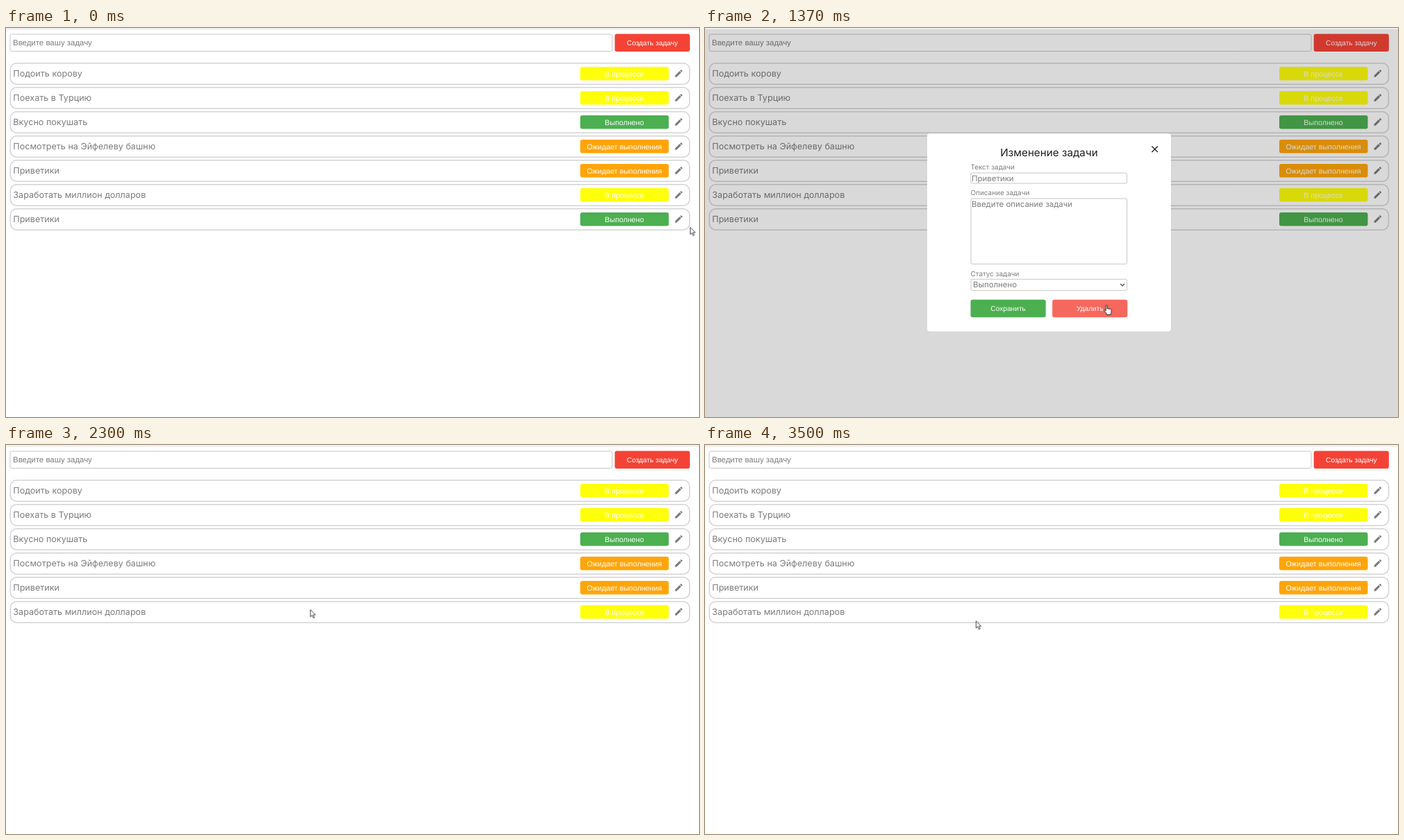
An HTML page that plays this animation: 998 by 561 pixels, repeating every 4270 ms.

```html
<!DOCTYPE html>
<html lang="ru">
<head>
<meta charset="utf-8">
<title>Список задач</title>
<style>
  html, body { margin: 0; width: 100%; height: 100%; overflow: hidden; background: #fff; }
  svg { display: block; width: 100%; height: 100%; }
  text { font-family: Inter, sans-serif; fill: #7c7c7c; text-rendering: geometricPrecision; }
  .arial { font-family: "Liberation Sans", Arial, sans-serif; }
  .button { font-size: 10.17px; fill: #fff; text-anchor: middle; }
  .badge { font-size: 10.74px; fill: #fff; text-anchor: middle; }
  .task { font-size: 12.6px; }
  .title { font-size: 15.26px; fill: #212121; text-anchor: middle; }
  .label { font-size: 9.95px; }
  .field { font-size: 11.45px; }
  .box { fill: #fff; stroke: #c6c6c6; }
  .row { fill: #fff; stroke: #d3d3d3; stroke-width: 1.5; }
  .pencil { fill: #7c7c7c; }
  .cursor { fill: #fff; stroke: #222; stroke-width: 1.3; stroke-linejoin: round; }
</style>
</head>
<body>
<svg id="stage" viewBox="0 0 998 561"></svg>
<script>
const LOOP = 4270;
const GREEN = '#4caf50', RED = '#f44336';
const STATUS = {
  progress: ['В процессе', '#ffff0a'],
  done: ['Выполнено', GREEN],
  waiting: ['Ожидает выполнения', '#ffa50a'],
};
const TASKS = [
  ['Подоить корову', 'progress'],
  ['Поехать в Турцию', 'progress'],
  ['Вкусно покушать', 'done'],
  ['Посмотреть на Эйфелеву башню', 'waiting'],
  ['Приветики', 'waiting'],
  ['Заработать миллион долларов', 'progress'],
  ['Приветики', 'done'],
];
const PENCIL = 'M3 17.25V21h3.75L17.81 9.94l-3.75-3.75L3 17.25z' +
  'M20.71 7.04c.39-.39.39-1.02 0-1.41l-2.34-2.34c-.39-.39-1.02-.39-1.41 0l-1.83 1.83 3.75 3.75 1.83-1.83z';

const rect = (x, y, w, h, rx, attrs) =>
  `<rect x="${x}" y="${y}" width="${w}" height="${h}" rx="${rx}" ${attrs}/>`;
const text = (x, y, cls, str) => `<text x="${x}" y="${y}" class="${cls}">${str}</text>`;
const button = (id, x, y, color, label) =>
  `<g id="${id}">${rect(x, y, 108.2, 25.5, 3, `fill="${color}"`)}${text(x + 54.1, y + 16.2, 'arial button', label)}</g>`;
const field = (y, h, label, value, indent = 1) =>
  text(382.5, y - 4.7, 'label', label) +
  rect(383, y, 224.7, h, 2, 'class="box"') +
  text(383 + indent, y + 12.1, 'field', value);

function taskRow([name, status], i) {
  const [label, color] = STATUS[status];
  return `<g id="task${i}" transform="translate(0 ${50 + i * 35})">
    ${rect(6.3, .8, 978.2, 30.4, 9, 'class="row"')}
    ${text(10.3, 20.4, 'task', name)}
    ${rect(827, 6, 127.5, 19.6, 3, `fill="${color}"`)}
    ${text(890.5, 19.8, 'arial badge', label)}
    <path class="pencil" transform="translate(961.8 8.4) scale(.59)" d="${PENCIL}"/>
  </g>`;
}

document.getElementById('stage').innerHTML = `
  ${rect(0, 1, 998, 1, 0, 'fill="#dedede"')}
  ${rect(6, 9, 867, 24.5, 2.5, 'class="box"')}
  ${text(10, 25, 'arial field', 'Введите вашу задачу')}
  ${button('create', 876.7, 8.5, RED, 'Создать задачу')}
  <g id="list">${TASKS.map(taskRow).join('')}</g>
  <g id="modal">
    ${rect(0, 2, 998, 559, 0, 'fill="#000" fill-opacity=".15"')}
    ${rect(320, 152, 351, 285.5, 4, 'fill="#fff"')}
    ${text(495.5, 185, 'title', 'Изменение задачи')}
    <path d="M643.5 170.5l8.5 8.5m0-8.5l-8.5 8.5" stroke="#212121" stroke-width="1.4"/>
    ${field(209, 15, 'Текст задачи', 'Приветики')}
    ${field(246, 94.3, 'Описание задачи', 'Введите описание задачи')}
    ${field(362.3, 16.3, 'Статус задачи', 'Выполнено', 3)}
    <path d="M598.3 369l2.9 2.9 2.9-2.9" fill="none" stroke="#444" stroke-width="1.3"/>
  </g>
  <g id="actions">
    ${button('save', 382.5, 391.7, GREEN, 'Сохранить')}
    ${button('remove', 500.2, 391.7, RED, 'Удалить')}
  </g>
  <g id="pointer">
    <path id="arrow" class="cursor" transform="translate(.4 .4) scale(.66)"
      d="M0 0V15.5l3.6-3.3 2.7 6 2.5-1.1-2.6-5.8H11z"/>
    <path id="hand" class="cursor" transform="translate(-3.8 0) scale(.76)"
      d="M4 2.2C4 .3 6.7.3 6.7 2.2V8c.2-1.5 2.7-1.4 2.7.3.3-1.2 2.6-1.1 2.6.6.4-1 2.4-.8 2.4 1v4
         c0 2.2-1.4 3-1.4 5.3H6C5.7 16.5 3.1 14.5 1.1 11.6.2 10 2 9 3 10.2l1 1.3z"/>
  </g>`;

// Each step is [time in ms, value, easing towards the next step].
function play(id, prop, steps, easing = 'step-end') {
  const frames = steps.map(([time, value, ease = easing]) =>
    ({ offset: time / LOOP, [prop]: value, easing: ease }));
  frames.push({ offset: 1, [prop]: steps.at(-1)[1] });
  document.getElementById(id).animate(frames, { duration: LOOP, iterations: Infinity });
}

const OPEN = 530, CLOSE = 1425, CLEARED = 1540;
const RELOAD = 2500, LOADED = 3060;
const HOVER_EDIT = 400, HOVER_REMOVE = 1090;

const fade = end => [[0, 0], [OPEN, 0, 'ease'], [OPEN + 600, 1], [end, 0]];
play('modal', 'opacity', fade(CLOSE));
play('actions', 'opacity', fade(CLEARED));
play('remove', 'opacity', [[0, 1], [HOVER_REMOVE, 1, 'ease'], [HOVER_REMOVE + 120, .8]]);
play('task6', 'opacity', [[0, 1], [CLOSE, 0]]);
play('list', 'opacity', [[0, 1], [RELOAD, 0], [LOADED, 1]]);

const hover = on => [0, HOVER_EDIT, OPEN + 30, HOVER_REMOVE, CLEARED]
  .map((time, i) => [time, i % 2 ? on : 1 - on]);
play('hand', 'opacity', hover(1));
play('arrow', 'opacity', hover(0));

const at = (time, x, y, ease) => [time, `translate(${x}px, ${y}px)`, ease];
play('pointer', 'transform', [
  at(0, 985, 287),
  at(HOVER_EDIT, 969, 272),
  at(OPEN + 20, 969, 272, 'ease-in'),
  at(630, 926, 283, 'ease-out'),
  at(HOVER_REMOVE, 578, 399),
  at(CLEARED, 578, 399),
  at(2050, 420, 190),
  at(2300, 438, 237),
  at(RELOAD, 424, 292),
  at(2900, 416, 229.5),
  at(3100, 414, 300),
  at(3330, 390, 253.5),
], 'ease-in-out');
</script>
</body>
</html>
```
